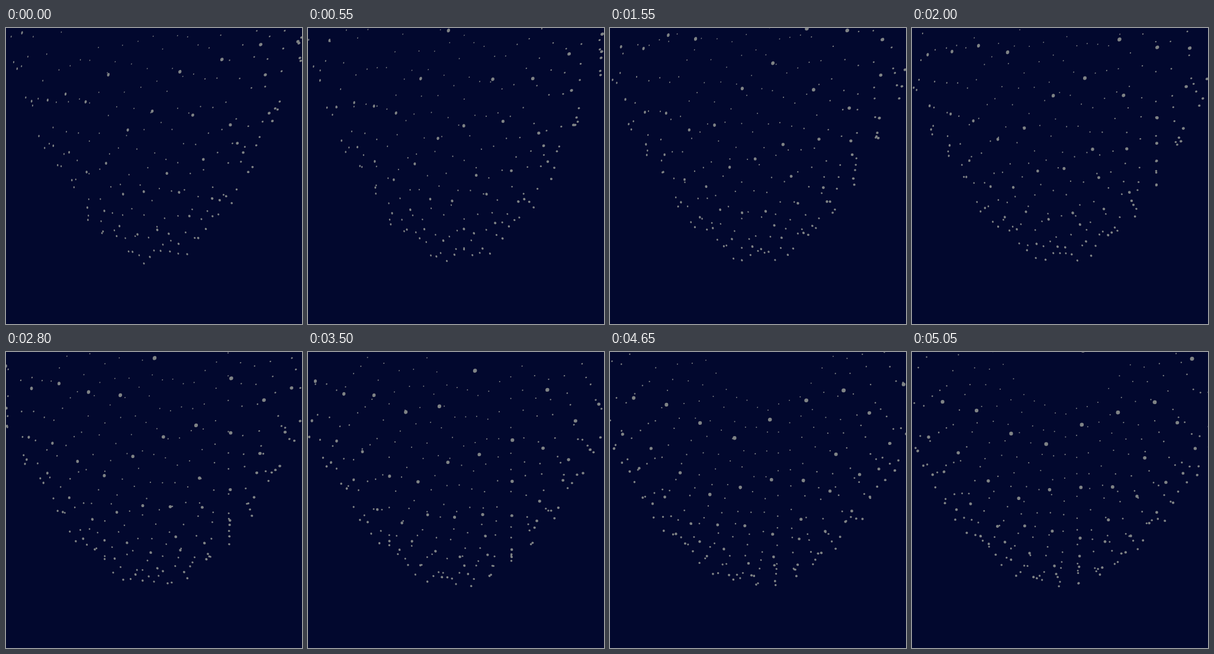
Recreate the animation shown at these times as an HTML page with a canvas. Size 500 by 500 pixels, loop 5100 ms.

```html
<!DOCTYPE html>
<html lang="en">
<head>
<meta charset="utf-8">
<title>Rippling bowl of dots</title>
<style>
  html, body { margin: 0; height: 100%; overflow: hidden; background: #02082e; }
  canvas { display: block; }
</style>
</head>
<body>
<canvas id="stage" width="500" height="500"></canvas>
<script>
const ctx = document.getElementById('stage').getContext('2d');
const LOOP = 5100, STEP = 50;
const MID = 250, FOCAL = 433;
// Lengths below are in grid steps.
const HALF = 10, CAMERA = 14.21, FLOOR = 4.406, RADIUS = 0.054;
const WAVE = 1.876;

function draw(t) {
  const yaw = 0.5505 - 0.098 * t;
  const sin = Math.sin(yaw), cos = Math.cos(yaw);
  const steepness = 0.1938 * Math.exp(-0.0842 * t);
  const crest = 5.444 - 0.5236 * t;

  ctx.setTransform(1, 0, 0, 1, 0, 0);
  ctx.fillStyle = '#02082e';
  ctx.fillRect(0, 0, 500, 500);
  ctx.fillStyle = '#7f8385';

  for (let row = -HALF; row <= HALF; row++) {
    for (let col = -HALF; col <= HALF; col++) {
      const ripple = 2 * Math.cos(WAVE * (col + row - crest));
      const x = col * cos + row * sin;
      const y = FLOOR + steepness * (ripple - col * col - row * row);
      const z = CAMERA + row * cos - col * sin;
      const scale = FOCAL / z;
      const top = MID + y * scale;
      if (top < -10) continue;

      // Each dot is a flat disc that turns with the grid.
      ctx.setTransform(scale * (cos + x * sin / z), scale * y * sin / z,
                       0, scale, MID + x * scale, top);
      ctx.beginPath();
      ctx.arc(0, 0, RADIUS, 0, 2 * Math.PI);
      ctx.fill();
    }
  }
}

const start = performance.now();
function tick() {
  const ms = (performance.now() - start) % LOOP;
  draw(Math.floor(ms / STEP) * STEP / 1000);
  requestAnimationFrame(tick);
}
tick();
</script>
</body>
</html>
```
